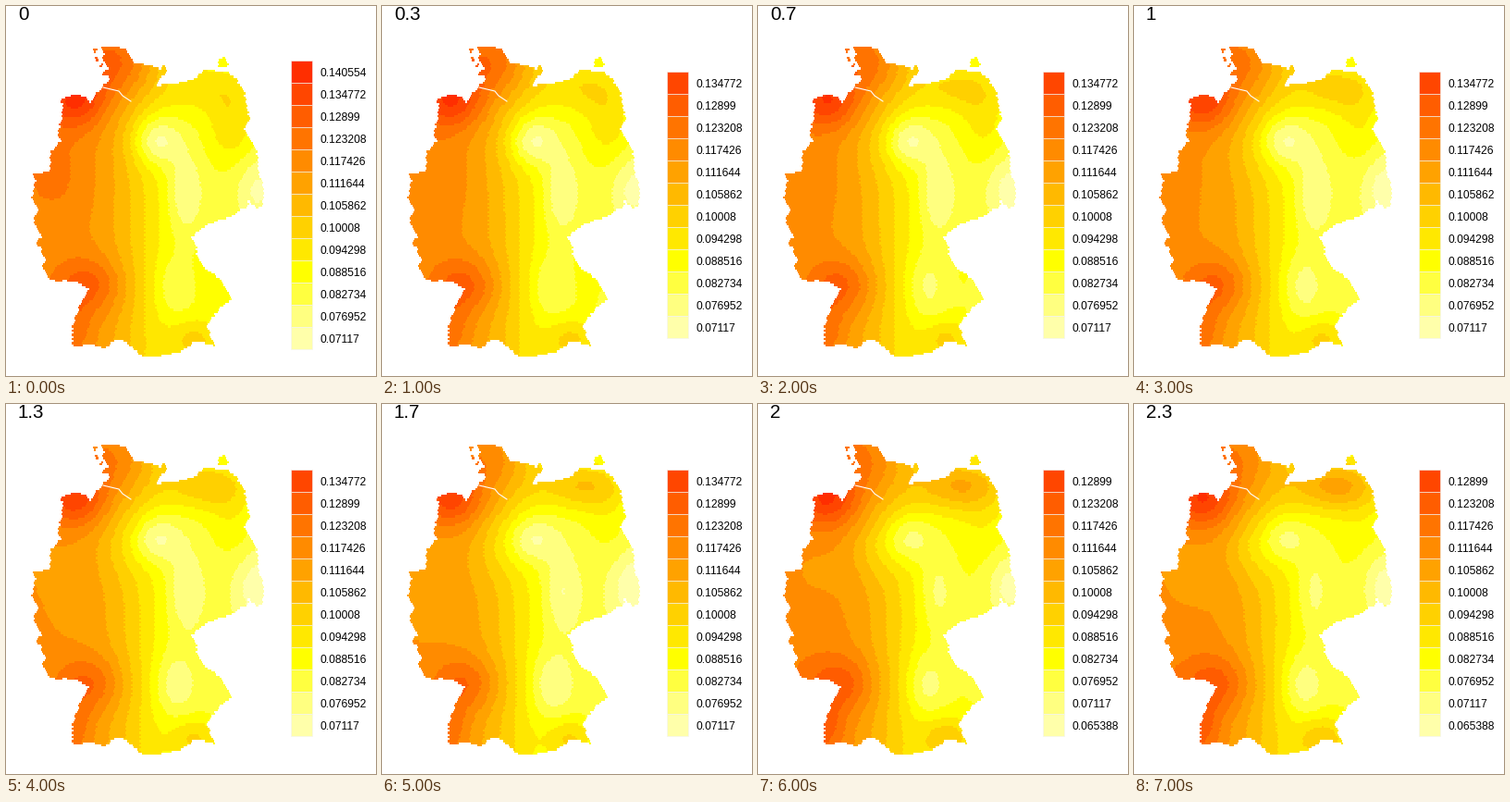
These frames come from a looping animation (400 px wide and 400 px high, 8 s). A matplotlib script:

```python
import numpy as np
import matplotlib.pyplot as plt
from matplotlib.animation import FuncAnimation
from matplotlib.colors import hsv_to_rgb
from matplotlib.patches import Rectangle
from matplotlib.path import Path

SIZE, DPI = 400, 100
STEPS, INTERVAL = 8, 1000
TOP_LEVEL, LEVEL_STEP = 0.140554, 0.005782
FIRST_BAND, LAST_BAND = 2, 14
CELL_W, CELL_H = 2.6, 2.25
KEY_X, KEY_W, KEY_H, KEY_MIDDLE = 308, 22.5, 24, 215

plt.rcParams["font.family"] = "Liberation Sans"

# Key points of the border, clockwise; fine detail is added by roughen()
BORDER = [
    (104, 45), (130, 47), (138, 62), (174, 71), (163, 86), (186, 84),
    (205, 77), (218, 68), (236, 70), (256, 88), (263, 122), (257, 133),
    (271, 157), (273, 180), (279, 208), (272, 222), (261, 208), (261, 217),
    (230, 231), (201, 250), (197, 247), (213, 280), (237, 307), (245, 316),
    (222, 339), (217, 346), (226, 368), (208, 362), (147, 378), (122, 360),
    (108, 369), (90, 366), (72, 367), (79, 328), (89, 306), (70, 297),
    (48, 295), (39, 281), (44, 274), (33, 256), (39, 247), (30, 233),
    (34, 220), (28, 210), (32, 187), (28, 181), (48, 177), (48, 160),
    (59, 147), (57, 135), (62, 106), (58, 102), (66, 97), (86, 97),
    (91, 107), (103, 90), (113, 77), (103, 75), (110, 66),
]
ISLANDS = [(96, 48, 3), (99, 58, 2), (103, 64, 2), (171, 68, 3), (235, 62, 6)]
ESTUARY = [(105, 88), (122, 92), (126, 97), (135, 103)]

# Bumps on the surface: x, y, width, height, amount at time 0, drift by time 2
BUMPS = [
    (75, 102, 34, 30, -3.9, 0.2),     # north-west coast
    (126, 60, 45, 38, -3.4, 1.4),     # northern peninsula
    (220, 88, 48, 28, -1.7, -2.3),    # Baltic coast
    (245, 130, 28, 42, -2.1, 1.2),    # north-east border
    (162, 146, 26, 26, 3.3, -0.7),    # pale core
    (125, 155, 28, 35, 0.0, 1.3),     # west of the core
    (194, 203, 18, 44, 2.1, -0.5),    # ridge south of the core
    (272, 198, 22, 36, 1.8, 0.5),     # eastern tip
    (55, 180, 40, 50, -0.9, 1.6),     # western border
    (90, 302, 36, 30, -2.6, 0.1),     # warm spot
    (72, 350, 22, 32, -1.5, -0.5),    # south-west corner
    (182, 303, 22, 34, 1.3, 0.7),     # southern pale spot
    (222, 290, 30, 50, -0.8, 0.8),    # south-east
    (205, 362, 28, 24, -2.4, -0.3),   # southern edge
]


def heat_palette(warm=12):
    """Red to yellow in equal hue steps, then ever paler yellows."""
    sats = np.r_[np.ones(warm), 3 / 4, 1 / 2, 1 / 3]
    hues = np.minimum(np.arange(len(sats)) / (warm - 1), 1) / 6
    return hsv_to_rgb(np.c_[hues, sats, np.ones(len(sats))])


def roughen(points, rng, levels=3, amount=0.1):
    """Midpoint displacement along a closed outline."""
    pts = np.array(points, float)
    for _ in range(levels):
        side = np.roll(pts, -1, axis=0) - pts
        normal = side[:, ::-1] * [1, -1]
        push = rng.uniform(-amount, amount, (len(pts), 1))
        middle = pts + side / 2 + normal * push
        pts = np.stack([pts, middle], axis=1).reshape(-1, 2)
    return pts


def islet(x, y, r, rng):
    angle = np.linspace(0, 2 * np.pi, 12, endpoint=False)
    radius = r * rng.uniform(0.6, 1.3, len(angle))
    return np.c_[x + radius * np.cos(angle), y + radius * np.sin(angle)]


def cell_centres():
    """Centre of the staggered cell under every pixel."""
    y, x = np.mgrid[:SIZE, :SIZE] + 0.5
    row = np.round(y / CELL_H)
    shift = row % 2 * 0.5
    col = np.round(x / CELL_W - shift)
    return np.c_[((col + shift) * CELL_W).ravel(), (row * CELL_H).ravel()]


def surface(x, y, time):
    """Palette position: a west-east ramp with slowly changing bumps."""
    part = time / 2
    z = 9 + 3 * np.tanh((x - 142) / 48) + 0.5 * part
    for bx, by, w, h, start, drift in BUMPS:
        bump = np.exp(-((x - bx) / w) ** 2 - ((y - by) / h) ** 2)
        z += (start + drift * part) * bump
    return z


def px(size):
    return size * 72 / DPI


palette = heat_palette()
rng = np.random.default_rng(4)
centres = cell_centres()
land = Path(roughen(BORDER, rng)).contains_points(centres)
for island in ISLANDS:
    land |= Path(islet(*island, rng)).contains_points(centres)
land_x, land_y = centres[land].T

fig = plt.figure(figsize=(SIZE / DPI, SIZE / DPI), dpi=DPI, facecolor="white")
ax = fig.add_axes([0, 0, 1, 1])
ax.set_xlim(0, SIZE)
ax.set_ylim(SIZE, 0)
ax.axis("off")

country = ax.imshow(np.ones((SIZE, SIZE, 3)), extent=(0, SIZE, SIZE, 0),
                    interpolation="nearest", aspect="auto")
ax.plot(*zip(*ESTUARY), color="white", lw=px(1.1))
title = ax.text(13, 15, "", fontsize=px(20.5), color="black")
keys, labels = [], []
for _ in range(LAST_BAND - FIRST_BAND + 1):
    key = Rectangle((KEY_X, 0), KEY_W, KEY_H, ec="#f2f2f2", lw=px(0.6))
    keys.append(ax.add_patch(key))
    labels.append(ax.text(339, 0, "", fontsize=px(12), color="black"))


def draw_legend(first, count, shift):
    top = KEY_MIDDLE - count * KEY_H / 2
    for i, (key, label) in enumerate(zip(keys, labels)):
        key.set_visible(i < count)
        label.set_visible(i < count)
        if i < count:
            level = first + i
            key.set_y(top + i * KEY_H)
            key.set_facecolor(palette[FIRST_BAND + level - shift])
            label.set_y(top + (i + 0.5) * KEY_H + 4.5)
            label.set_text(f"{TOP_LEVEL - level * LEVEL_STEP:.6g}")


def update(step):
    time = step / 3
    shift = int(time >= 2)  # the colour scale moves on by one level
    position = surface(land_x, land_y, time) - 0.8 * shift
    band = np.clip(np.round(position), FIRST_BAND, LAST_BAND).astype(int)
    image = np.ones((SIZE * SIZE, 3))
    image[land] = palette[band]
    country.set_data(image.reshape(SIZE, SIZE, 3))
    title.set_text(f"{round(time, 1):g}")
    if step == 0:
        draw_legend(0, 13, 0)
    else:
        draw_legend(1 + shift, 12, shift)
    return [country, title, *keys, *labels]


anim = FuncAnimation(fig, update, frames=STEPS, interval=INTERVAL,
                     repeat=True, repeat_delay=0, blit=False)
plt.show()
```
